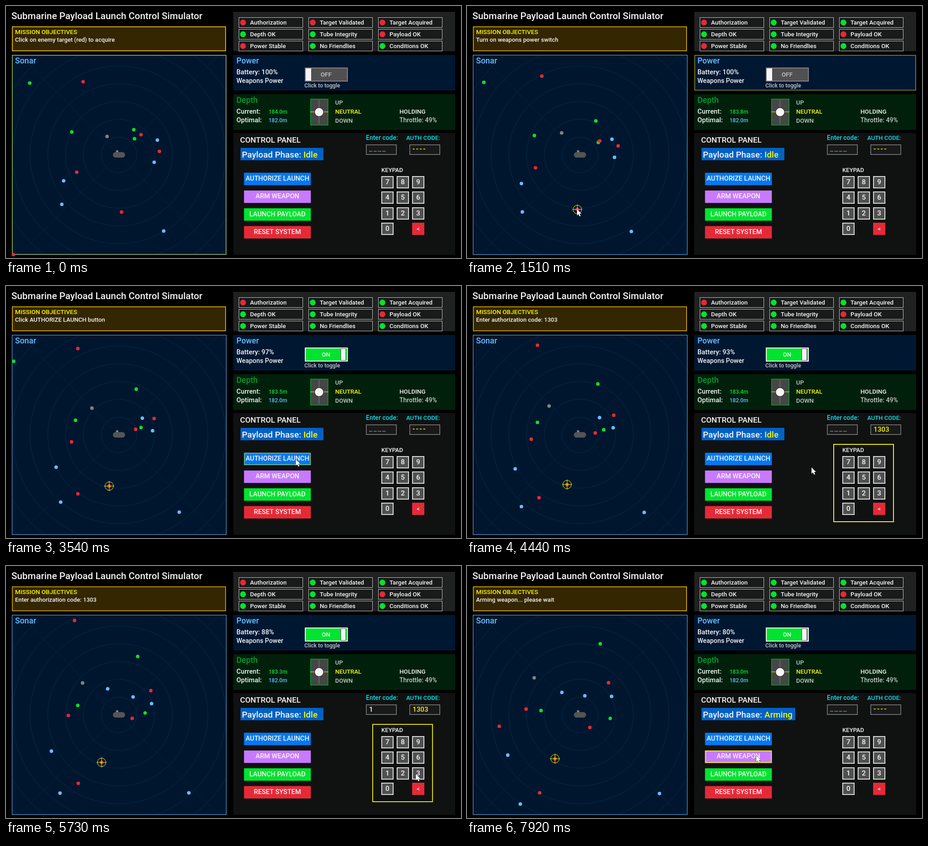
Write an HTML page with a canvas that moves like this. It is 1005 px wide and 557 px high and loops after 7.99 s.

```html
<!DOCTYPE html>
<html>
<head>
<meta charset="utf-8">
<style>
html, body { margin: 0; width: 100%; height: 100%; overflow: hidden; background: #000; }
canvas { display: block; }
</style>
</head>
<body>
<canvas id="stage" width="1005" height="557"></canvas>
<script>
const ctx = document.getElementById('stage').getContext('2d');
const LOOP = 7.99;
const RED = '#e62937', GREEN = '#00e430', SKY = '#66bfff', GRAY = '#828282',
  YELLOW = '#fdf900', WHITE = '#f5f5f5', SILVER = '#c8c8c8', LEAF = '#009e2f';

// Moments (s) at which the operator's clicks take effect
const ACQUIRE = 1.2, POWER = 2.78, AUTHORIZE = 3.7, ACCEPT = 6.85, ARM = 7.62;
const KEY_TIMES = [5.45, 5.92, 6.35, ACCEPT];
const CLICKS = [ACQUIRE, POWER, AUTHORIZE, ...KEY_TIMES, ARM];
const CODE = '1303';

// Contacts: colour, x, y, speed x, speed y, appears, disappears
const CONTACTS = [
  [GREEN, 52, 170, -10, -1.1, 0, 3.8],
  [RED, 170, 167, -3.3, -8.2, 0, 7.1],
  [GREEN, 145, 278, 2.3, 5.2],
  [GRAY, 223, 288, -9.45, -5.2],
  [GREEN, 282, 273, 1.5, -12.8],
  [GREEN, 283.5, 293, 4.1, 5.5],
  [RED, 298, 284, -3.4, 9.15],
  [SKY, 334, 296, -9.35, -1.2],
  [RED, 338.5, 321, -3.3, -8],
  [SKY, 327, 345, -1, -7.2],
  [RED, 156, 367, -3.25, -6.45],
  [SKY, 127, 386, -4.7, 4],
  [SKY, 123, 438, -0.7, 11.1],
  [SKY, 348, 497, 9.7, 0.7],
  [RED, 16, 549, -6, 2, 0, 0.4],
  [RED, 157, 425, 0.4, 9.6, 1.9],
  [SKY, 263.5, 250.5, -6.85, 3.6, 4.9],
  [RED, 71, 354, 0, 0, 7.4]
];
const TARGET = [255, 455, -7.7, -3.7];
const DOT = 3.9;

// Pointer path: time, x, y
const PATH = [
  [0.2, 720, 300], [1.1, 243, 449], [1.75, 243, 449], [2.6, 684, 154], [2.95, 684, 154],
  [3.5, 640, 383], [3.9, 640, 383], [4.4, 761, 401], [4.8, 761, 401], [5.3, 843, 457],
  [5.45, 843, 457], [5.75, 906, 460], [5.95, 906, 460], [6.2, 843, 491], [6.38, 843, 491],
  [6.65, 910, 451], [7, 910, 451], [7.5, 639, 419], [8, 639, 419]
];
const ARROW = new Path2D('M0 0V14L3.2 11L5.6 16L8 15L5.7 10H10Z');

function box(x, y, w, h, fill, border, line = 1) {
  if (fill) { ctx.fillStyle = fill; ctx.fillRect(x, y, w, h); }
  if (border) {
    ctx.strokeStyle = border;
    ctx.lineWidth = line;
    ctx.strokeRect(x + line / 2, y + line / 2, w - line, h - line);
  }
}

function text(str, x, y, size, color, align = 'left', spacing = 0) {
  ctx.font = '500 ' + size + 'px Roboto, sans-serif';
  ctx.letterSpacing = spacing + 'px';
  ctx.textAlign = align;
  ctx.fillStyle = color;
  ctx.fillText(str, x, y);
}

function disc(x, y, r, color) {
  ctx.fillStyle = color;
  ctx.beginPath();
  ctx.arc(x, y, r, 0, Math.PI * 2);
  ctx.fill();
}

function ring(x, y, r) {
  ctx.beginPath();
  ctx.arc(x, y, r, 0, Math.PI * 2);
  ctx.stroke();
}

function line(x1, y1, x2, y2) {
  ctx.beginPath();
  ctx.moveTo(x1, y1);
  ctx.lineTo(x2, y2);
  ctx.stroke();
}

const wave = (t, peak, period) => Math.cos((t - peak) / period * Math.PI * 2);

function highlight(t, x, y, w, h) {
  ctx.globalAlpha = 0.67 + 0.3 * wave(t, 4.47, 0.671);
  box(x, y, w, h, null, YELLOW, 2);
  ctx.globalAlpha = 1;
}

function drawMission(t) {
  const message =
    t < ACQUIRE ? 'Click on enemy target (red) to acquire' :
    t < POWER ? 'Turn on weapons power switch' :
    t < AUTHORIZE ? 'Click AUTHORIZE LAUNCH button' :
    t < ACCEPT ? 'Enter authorization code: ' + CODE :
    t < ARM ? 'Click ARM WEAPON button' : 'Arming weapon... please wait';
  text('Submarine Payload Launch Control Simulator', 12, 29, 20.8, WHITE);
  box(13, 45, 473, 55, '#332600');
  ctx.globalAlpha = 0.75 + 0.1 * wave(t, 2.64, 0.687);
  box(13, 45, 473, 55, null, '#ffcb00', 2);
  ctx.globalAlpha = 1;
  text('MISSION OBJECTIVES', 20, 62, 13.6, YELLOW);
  text(message, 20, 79, 13.1, WHITE);
}

function drawSonar(t) {
  const cx = 249.5, cy = 329;
  ctx.save();
  ctx.beginPath();
  ctx.rect(13, 108, 474, 442);
  ctx.clip();
  box(13, 108, 474, 442, '#00162f');
  ctx.strokeStyle = '#052a45';
  ctx.lineWidth = 1;
  for (let i = 1; i <= 8; i++) ring(cx, cy, i * 39.3);
  ctx.strokeStyle = '#04233b';
  line(cx - 240, cy - 240, cx + 240, cy + 240);
  line(cx - 240, cy + 240, cx + 240, cy - 240);
  ctx.restore();
  if (t < ACQUIRE) highlight(t, 13, 108, 474, 442);
  box(13, 108, 474, 442, null, t < ACQUIRE ? 'rgba(102,191,255,0.5)' : SKY);
  text('Sonar', 20, 127, 17.8, SKY);

  box(243, 319, 5, 6, GRAY);
  ctx.fillStyle = '#555';
  ctx.beginPath();
  ctx.roundRect(236, 323, 27, 12, 6);
  ctx.fill();

  for (const [color, x, y, vx, vy, from = 0, to = LOOP] of CONTACTS)
    if (t >= from && t < to) disc(x + vx * t + 0.3, y + vy * t + 0.3, DOT, color);

  const x = TARGET[0] + TARGET[2] * t + 0.3, y = TARGET[1] + TARGET[3] * t + 0.3;
  disc(x, y, DOT, RED);
  if (t >= ACQUIRE) {
    ctx.strokeStyle = YELLOW;
    ctx.lineWidth = 1;
    ring(x, y, 9.4);
    line(x - 11, y, x + 11, y);
    line(x, y - 11, x, y + 11);
  }
}

function drawStatus(t) {
  const items = [
    ['Authorization', t >= ACCEPT], ['Target Validated', t >= ACQUIRE], ['Target Acquired', t >= ACQUIRE],
    ['Depth OK', true], ['Tube Integrity', true], ['Payload OK', false],
    ['Power Stable', t >= POWER], ['No Friendlies', true], ['Conditions OK', true]
  ];
  box(502, 13, 490, 87, '#202121');
  items.forEach(([label, ok], i) => {
    const x = 514 + i % 3 * 154, y = 25 + Math.floor(i / 3) * 26;
    box(x, y, 142, 23, '#191a1a', SILVER);
    disc(x + 9.5, y + 11.5, 6.5, ok ? GREEN : RED);
    text(label, x + 25, y + 16, 13.4, WHITE);
  });
}

function drawPower(t) {
  const on = t >= POWER;
  const battery = on ? Math.round(100 - 3.9 * (t - 2.75)) : 100;
  box(502, 108, 490, 79, '#001732');
  if (t >= ACQUIRE && !on) highlight(t, 502, 108, 490, 79);
  text('Power', 509, 127, 17.5, SKY);
  text('Battery: ' + battery + '%', 509, 151, 14.8, WHITE);
  text('Weapons Power', 509, 170, 14.3, WHITE);
  box(660, 136, 95, 31, on ? GREEN : '#505050', on ? WHITE : GRAY, 2);
  box(on ? 739 : 662, 138, 12, 27, WHITE, on ? '#505050' : null);
  text(on ? 'ON' : 'OFF', 707, 156, 13.5, on ? WHITE : SILVER, 'center');
  text('Click to toggle', 659, 180, 12.3, SILVER);
}

function drawDepth(t) {
  box(502, 195, 490, 79, '#00200c');
  text('Depth', 509, 214, 17.8, LEAF);
  text('Current:', 509, 238, 14.8, WHITE);
  text('Optimal:', 509, 257, 14.8, WHITE);
  text((184 - 0.13 * t).toFixed(1) + 'm', 580, 238, 12, GREEN);
  text('182.0m', 580, 257, 12, SKY);
  box(672, 205, 40, 59, '#464646', LEAF, 1.5);
  box(690, 208, 3, 53, '#5c5c5c');
  box(672, 233.5, 40, 1, YELLOW);
  disc(691.5, 234.5, 10.2, '#222');
  disc(691.5, 234.5, 9.3, WHITE);
  text('UP', 727, 218, 13.3, SILVER);
  text('NEUTRAL', 727, 238, 13.3, YELLOW);
  text('DOWN', 727, 258, 13.3, SILVER);
  text('HOLDING', 869, 238, 13.5, WHITE);
  text('Throttle: 49%', 869, 257, 14, SILVER);
}

function codeField(x, value, empty, color, emptyColor) {
  box(x, 306, 68, 23, '#191919', GRAY, 1.5);
  if (value) text(value, x + 7, 322, 15.2, color);
  else text(empty, x + 7, empty === '____' ? 320 : 321, 16, emptyColor, 'left', 2.5);
}

function drawControls(t) {
  const arming = t >= ARM, entering = t >= AUTHORIZE && t < ACCEPT;
  box(502, 281, 490, 269, '#101111');
  text('CONTROL PANEL', 517, 302, 17.2, WHITE);
  box(518, 313.5, arming ? 207 : 183, 27.5, '#0062c6');
  text('Payload Phase:', 521, 335, 19, WHITE);
  text(arming ? 'Arming' : 'Idle', 657, 335, 19, YELLOW);

  const buttons = [['AUTHORIZE LAUNCH', '#0079f1'], ['ARM WEAPON', '#c87aff'],
    ['LAUNCH PAYLOAD', GREEN], ['RESET SYSTEM', RED]];
  buttons.forEach(([label, color], i) => {
    const y = 368.5 + i * 39.3;
    box(525.7, y, 147.6, 27.5, color);
    text(label, 599.5, y + 17.5, 14.7, WHITE, 'center');
  });
  if (t >= POWER && t < AUTHORIZE) highlight(t, 525.7, 368.5, 147.6, 27.5);
  if (t >= ACCEPT) highlight(t, 525.7, 407.8, 147.6, 27.5);

  const typed = entering ? KEY_TIMES.filter(k => t >= k).length : 0;
  text('Enter code:', 795, 296, 14, '#00e5ee');
  text('AUTH CODE:', 884, 296, 13.1, '#00e5ee');
  codeField(795, CODE.slice(0, typed), '____', WHITE, GRAY);
  codeField(891, entering ? CODE : '', '----', YELLOW, YELLOW);

  if (entering) highlight(t, 809, 349, 134, 173);
  text('KEYPAD', 829, 367, 13.1, WHITE);
  [...'7894561230 <'].forEach((key, i) => {
    if (key === ' ') return;
    const x = Math.floor(829 + i % 3 * 34.3), y = Math.floor(376.5 + Math.floor(i / 3) * 34.3);
    const pressed = KEY_TIMES.some((k, n) => CODE[n] === key && Math.abs(t - k + 0.02) < 0.12);
    const erase = key === '<';
    box(x, y, 27, 27, erase ? RED : pressed ? '#e0e0e0' : '#505050', erase ? RED : WHITE, 1.7);
    text(key, x + 13.5, y + (erase ? 18 : 17.5), erase ? 13 : 15.5, WHITE, 'center');
  });
}

function drawPointer(t) {
  const i = PATH.findIndex(p => p[0] > t);
  if (i < 1) return;
  const [t0, x0, y0] = PATH[i - 1], [t1, x1, y1] = PATH[i];
  const u = (t - t0) / (t1 - t0), k = u * u * (3 - 2 * u);
  const x = x0 + (x1 - x0) * k, y = y0 + (y1 - y0) * k;
  if (CLICKS.some(c => t > c - 0.14 && t < c + 0.1)) disc(x, y + 1, 10, 'rgba(240,225,40,0.7)');
  ctx.save();
  ctx.translate(x, y);
  ctx.fillStyle = '#fff';
  ctx.strokeStyle = '#111';
  ctx.lineWidth = 1;
  ctx.stroke(ARROW);
  ctx.fill(ARROW);
  ctx.restore();
}

function frame() {
  const t = performance.now() / 1000 % LOOP;
  box(0, 0, 1005, 557, '#000');
  for (const draw of [drawMission, drawSonar, drawStatus, drawPower, drawDepth, drawControls, drawPointer]) draw(t);
  requestAnimationFrame(frame);
}
frame();
</script>
</body>
</html>
```
